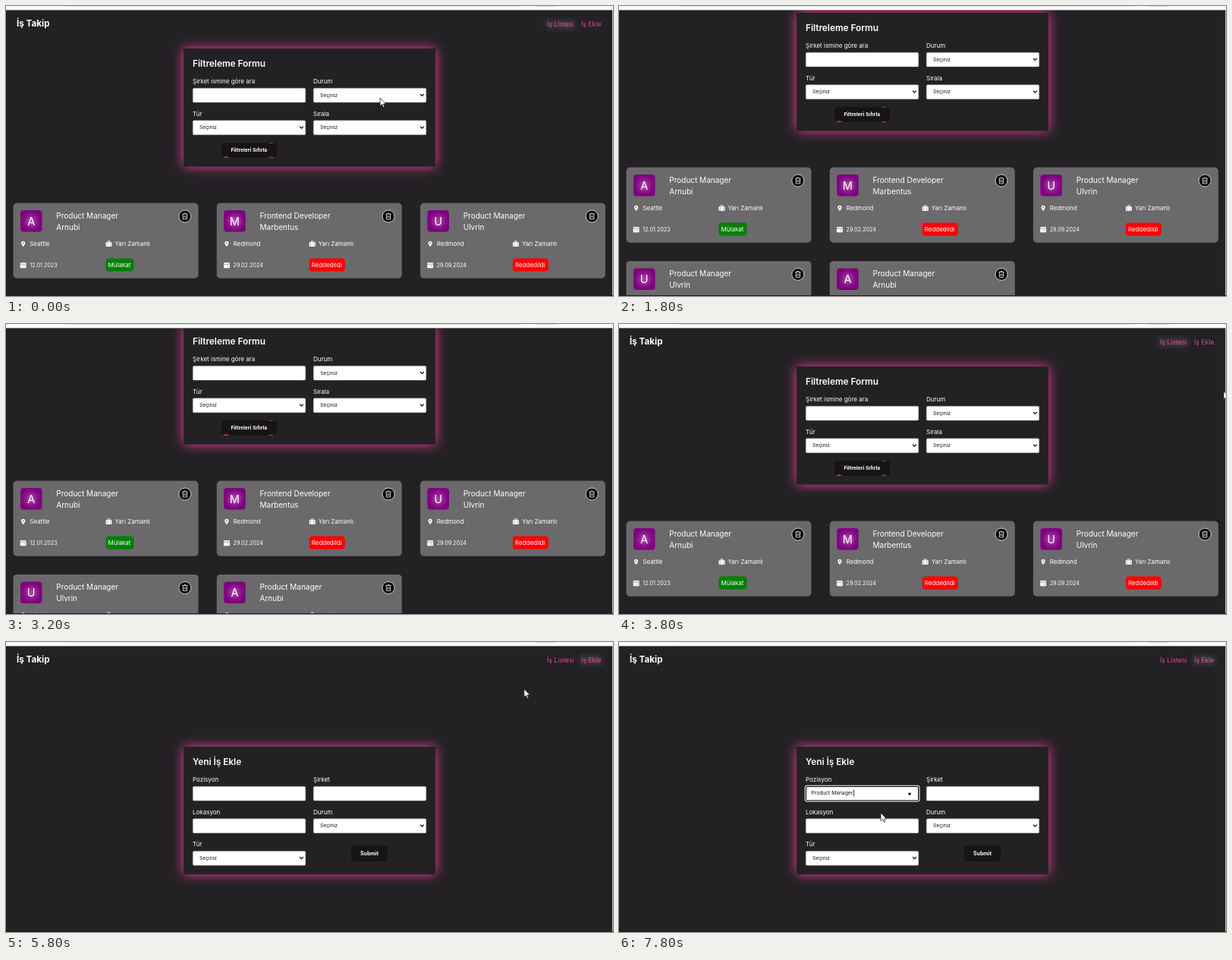
Write an HTML page that moves like this. It is 800x382 px and loops after 8000 ms.

```html
<!DOCTYPE html>
<html lang="tr">
<head>
<meta charset="utf-8">
<title>İş Takip</title>
<style>
html, body { margin: 0; width: 100%; height: 100%; overflow: hidden; background: #232124; }
svg { display: block; width: 800px; height: 382px; font-family: Inter, "Open Sans", sans-serif; }
.bold { font-weight: 700; }
.semi { font-weight: 600; }
.mid { text-anchor: middle; }
.glow { filter: blur(8px); fill: #f03fa0; }
.link { fill: #e0489a; }
.active { filter: drop-shadow(0 0 4px #fffb); }
.letter { filter: drop-shadow(0 0 3px #fff9); }

[class*="t-"] { animation: 8s step-end infinite; }
.t-scroll { animation-name: scroll; }
.t-move { animation-name: move; }
.t-list { animation-name: list; }
.t-add { animation-name: add; }
.t-status { animation-name: status; }
.t-focus { animation-name: focus; }
.t-menu { animation-name: menu; }
.t-hover { animation-name: hover; }
.t-caret { animation-name: caret; }
.t-picked { animation-name: picked; }
.t-arrow { animation-name: arrow; }
.t-hand { animation-name: hand; }
.t-beam { animation-name: beam; }

@keyframes scroll {
  0% { transform: translateY(0); }
  15% { transform: translateY(0); animation-timing-function: steps(3); }
  22.5% { transform: translateY(-47px); animation-timing-function: steps(4); }
  32.5% { transform: translateY(-106px); animation-timing-function: steps(3); }
  40% { transform: translateY(-53px); animation-timing-function: steps(2); }
  45%, to { transform: translateY(0); }
}
@keyframes move {
  0% { transform: translate(493px, 121px); animation-timing-function: steps(5); }
  12.5% { transform: translate(804px, 100px); }
  45% { transform: translate(804px, 100px); animation-timing-function: steps(6); }
  60% { transform: translate(762px, 31px); }
  62.5% { transform: translate(763px, 28px); }
  70% { transform: translate(763px, 28px); animation-timing-function: steps(5); }
  82.5% { transform: translate(362px, 197px); }
  85% { transform: translate(362px, 197px); animation-timing-function: steps(3); }
  92.5%, to { transform: translate(345px, 225px); }
}
@keyframes list { 0% { opacity: 1; } 70%, to { opacity: 0; } }
@keyframes add { 0% { opacity: 0; } 70%, to { opacity: 1; } }
@keyframes status { 0% { opacity: 0; } 65% { opacity: 1; } 70%, to { opacity: 0; } }
@keyframes focus { 0% { opacity: 0; } 85%, to { opacity: 1; } }
@keyframes menu { 0% { opacity: 0; } 85% { opacity: 1; } 97.5%, to { opacity: 0; } }
@keyframes hover { 0% { opacity: 0; } 90% { opacity: 1; } 97.5%, to { opacity: 0; } }
@keyframes caret { 0% { opacity: 0; } 85% { opacity: 1; } 92.5%, to { opacity: 0; } }
@keyframes picked { 0% { opacity: 0; } 97.5%, to { opacity: 1; } }
@keyframes arrow { 0% { opacity: 1; } 62.5% { opacity: 0; } 72.5% { opacity: 1; } 82.5% { opacity: 0; } 90%, to { opacity: 1; } }
@keyframes hand { 0% { opacity: 0; } 62.5% { opacity: 1; } 72.5%, to { opacity: 0; } }
@keyframes beam { 0% { opacity: 0; } 82.5% { opacity: 1; } 90%, to { opacity: 0; } }
</style>
</head>
<body>
<svg id="stage" viewBox="0 0 800 382"></svg>
<script>
const text = (x, y, s, size = 8, cls = "", fill = "#fff") =>
  `<text x="${x}" y="${y}" font-size="${size}" class="${cls}"${cls.includes("link") ? "" : ` fill="${fill}"`}>${s}</text>`;
const rect = (x, y, w, h, fill, r = 0, more = "") =>
  `<rect x="${x}" y="${y}" width="${w}" height="${h}" rx="${r}" fill="${fill}" ${more}/>`;
const path = (d, fill, more = "") => `<path d="${d}" fill="${fill}" ${more}/>`;
const group = (cls, ...parts) => `<g class="${cls}">${parts.join("")}</g>`;
const at = (x, y, ...parts) => `<g transform="translate(${x} ${y})">${parts.join("")}</g>`;

const header = adding => text(14, 27, "İş Takip", 11.7, "bold")
  + text(713, 27, "İş Listesi", 8.7, adding ? "link" : "link active")
  + text(758, 27, "İş Ekle", 8.7, adding ? "link active" : "link");

const panel = (y, h, title) =>
  `<rect class="glow" x="234" y="${y}" width="332" height="${h}"/>`
  + rect(234, y, 332, h, "#232124") + text(246, y + 24, title, 11.8, "semi");

const field = (x, y, label, select = true) => text(x, y, label)
  + rect(x + .25, y + 6.25, 148.5, 18.8, "#fff", 1.5, 'stroke="#999" stroke-width=".5"')
  + (select ? text(x + 9, y + 17.8, "Seçiniz", 6.7, "", "#111")
    + path(`M${x + 141} ${y + 14}l2.4 2.4 2.4-2.4`, "none", 'stroke="#111" stroke-width="1.3"') : "");

const icons = {
  pin: path("M0-3.6a2.6 2.6 0 0 1 2.6 2.6C2.6.8 0 3.8 0 3.8S-2.6.8-2.6-1A2.6 2.6 0 0 1 0-3.6zm0 1.7a.9.9 0 1 0 .01 0z", "#fff"),
  bag: rect(-4, -2.2, 8, 6, "#fff", 1) + rect(-1.6, -3.6, 3.2, 2.4, "none", .5, 'stroke="#fff" stroke-width=".9"')
    + path("M-2.2-2v6M2.2-2v6", "none", 'stroke="#6b696c" stroke-width=".5"'),
  date: rect(-4, -3.4, 8, 7.4, "#fff", 1) + path("M-4-1.2h8M.5 1.4h2", "none", 'stroke="#6b696c" stroke-width=".7"'),
  bin: `<circle r="8" fill="#000" stroke="#ddd" stroke-width=".9"/>`
    + path("M-3.6-3h7.2M-1.2-4h2.4M-2.7-3v7h5.4v-7M-1-1v3.4M1-1v3.4", "none", 'stroke="#fff" stroke-width=".8"'),
};
const states = { "Mülakat": ["#008000", 37], "Reddedildi": ["#f00", 47], "Devam Ediyor": ["#ffa500", 58] };

const card = ([job, firm, city, kind, date, state], i) => {
  const [color, width] = states[state];
  return at(9.5 + i % 3 * 268.2, 259.5 + Math.floor(i / 3) * 123.4,
    rect(0, 0, 244, 99.3, "#6b696c", 5),
    rect(9.5, 9.5, 28.5, 28.5, "url(#plum)", 4),
    text(23.7, 29.5, firm[0], 14.5, "mid letter"),
    text(56.8, 20, job, 10), text(56.8, 35, firm, 10),
    at(226.3, 17.5, icons.bin),
    at(13.2, 53.8, icons.pin), text(21.8, 56.7, city),
    at(126, 53.8, icons.bag), text(134, 56.7, kind),
    at(13.2, 81.8, icons.date), text(21.8, 84.5, date, 7.2),
    rect(122, 73, width, 17, color, 4), text(125, 84.6, state));
};

const jobs = [
  ["Product Manager", "Arnubi", "Seattle", "Yarı Zamanlı", "12.01.2023", "Mülakat"],
  ["Frontend Developer", "Marbentus", "Redmond", "Yarı Zamanlı", "29.02.2024", "Reddedildi"],
  ["Product Manager", "Ulvrin", "Redmond", "Yarı Zamanlı", "29.09.2024", "Reddedildi"],
  ["Product Manager", "Ulvrin", "Türkiye", "Tam Zamanlı", "01.03.2022", "Devam Ediyor"],
  ["Product Manager", "Arnubi", "Seattle", "Staj", "03.12.2024", "Devam Ediyor"],
];

const resetButton = rect(284, 180, 73, 19.7, "#161416", 4)
  + path("M285.5 199.7q4.5-3 9 0zM345.5 180q4 1.6 8 0zM345.5 199.7q4-2 8 0z", "#e83e8c")
  + text(320.3, 192.3, "Filtreleri Sıfırla", 6.7, "bold mid");

const listPage = group("t-list", group("t-scroll",
  header(false), panel(56, 155.5, "Filtreleme Formu"),
  field(246, 102, "Şirket ismine göre ara", false), field(405, 102, "Durum"),
  field(246, 144.6, "Tür"), field(405, 144.6, "Sırala"),
  resetButton, ...jobs.map(card)));

const addPage = group("t-add",
  header(true), panel(138, 168, "Yeni İş Ekle"),
  field(246, 184, "Pozisyon", false), field(405, 184, "Şirket", false),
  field(246, 226.6, "Lokasyon", false), field(405, 226.6, "Durum"),
  field(246, 269.2, "Tür"),
  rect(455, 268, 48, 21, "#161416", 4), text(479, 280.7, "Submit", 6.9, "bold mid"),
  group("t-focus",
    rect(246.5, 190.5, 148, 18.3, "#fff", 1.5, 'stroke="#111" stroke-width="1"'),
    rect(245.2, 189.2, 150.8, 20.8, "none", 2, 'stroke="#fff" stroke-width="1"'),
    path("M380.6 198.8h4.8l-2.4 4z", "#111")),
  `<g class="t-caret">${rect(253.6, 195, .8, 9, "#111")}</g>`,
  group("t-picked", text(253.5, 201.3, "Product Manager", 6.7, "", "#111"), rect(309, 194.5, .8, 9, "#111")),
  group("t-menu",
    rect(304, 215, 92.5, 47.8, "#fff", 4), path("M311 215.2l5-5 5 5z", "#fff"),
    group("t-hover", rect(304, 219, 92.5, 20, "#e6e6e6")),
    text(311, 231.5, "Product Manager", 7.6, "", "#333"),
    text(311, 253, "Frontend Developer", 7.6, "", "#333")));

const browser = rect(0, 0, 800, 5.4, "#f8fafd")
  + rect(78, -4, 602, 5, "#dfe3ea", 2) + rect(697, -4, 29, 5, "#d3d8e2", 2)
  + rect(799.2, 0, .8, 382, "#e8e8ea") + rect(0, 381, 800, 1, "#2a1420");

const status = group("t-status", rect(0, 374, 66, 8, "#dfe1e5", 1),
  `<text x="2" y="381" font-size="7" font-family="Roboto, sans-serif" fill="#4a4d52">localhost:5173/add</text>`);

const edge = 'stroke="#111" stroke-width=".7" stroke-linejoin="round"';
const pointer = group("t-move",
  group("t-arrow", path("M0 0v10.8l2.5-2.2 1.8 4 1.7-.8-1.8-3.8h3.4z", "#fff", edge)),
  group("t-hand", path("M-.8 0q1.6-1 1.8.8v3.6l4 .8q1 .3 1 1.5l-.8 3.6-.8 2h-4.6l-3-4.6q-.5-1.4.9-1l1.5 1z", "#fff", edge)),
  group("t-beam", path("M-2-4.6h1.4l.6.6.6-.6h1.4M0-4v8M-2 4.6h1.4l.6-.6.6.6h1.4", "none", 'stroke="#111" stroke-width=".9"')));

document.getElementById("stage").innerHTML =
  `<defs><radialGradient id="plum"><stop stop-color="#9c2a9c"/><stop offset="1" stop-color="#7d007d"/></radialGradient></defs>`
  + rect(0, 0, 800, 382, "#232124") + listPage + addPage + browser + status + pointer;
</script>
</body>
</html>
```
